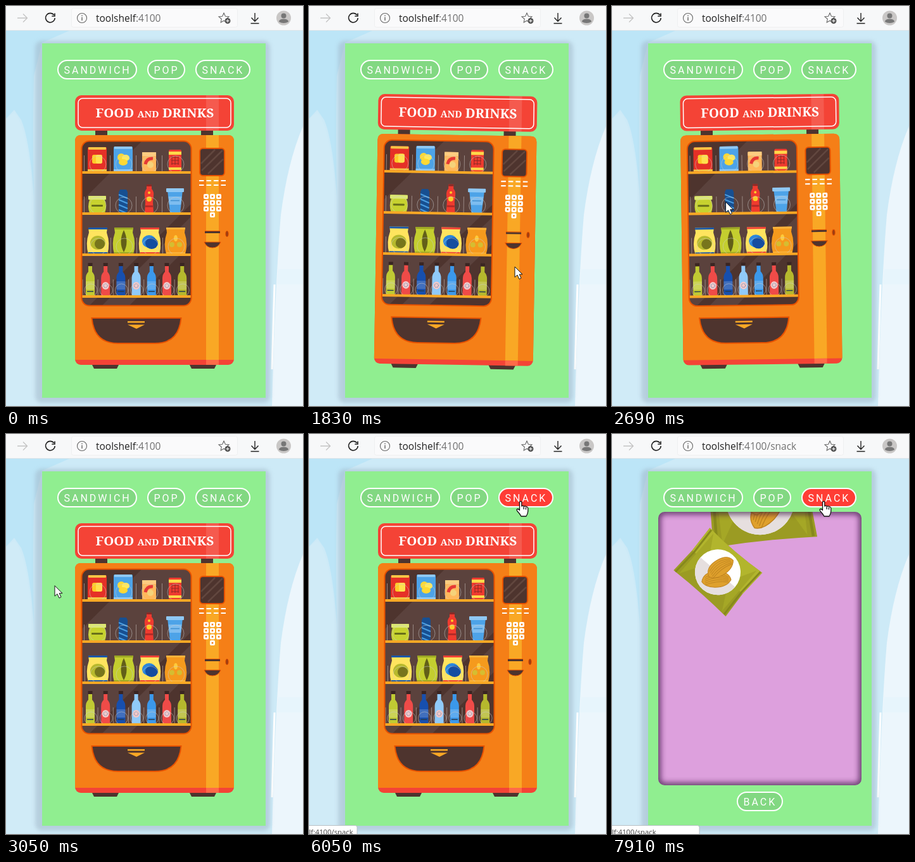
Write an HTML page that moves like this. It is 469 px wide and 632 px high and loops after 8 s.

```html
<!DOCTYPE html>
<html lang="en">
<head>
<meta charset="utf-8">
<title>Vending machine</title>
<style>
  html, body { margin: 0; width: 100%; height: 100%; overflow: hidden; }
  svg { display: block; width: 469px; height: 632px; }
  .ui { font: 15.5px "Open Sans", "Noto Sans", sans-serif; }
  .button text { font: 16px Roboto, sans-serif; letter-spacing: 3px; fill: #fff; }
  .sign { font-family: "Noto Serif", serif; font-weight: 600; font-stretch: extra-condensed; fill: #fff; text-anchor: middle; }
</style>
</head>
<body>
<svg id="stage" viewBox="0 0 469 632" xmlns="http://www.w3.org/2000/svg"></svg>
<script>
const DARK = '#4e342e', RED = '#f44336', ORANGE = '#f57f17', AMBER = '#f9a825', RIM = '#e65100';
const LOOP = 8000, OPEN_AT = 6320;

// Markup helpers
const rect = (x, y, w, h, fill, r = 0, extra = '') =>
  `<rect x="${x}" y="${y}" width="${w}" height="${h}" rx="${r}" fill="${fill}" ${extra}/>`;
const oval = (x, y, rx, ry, fill, extra = '') =>
  `<ellipse cx="${x}" cy="${y}" rx="${rx}" ry="${ry}" fill="${fill}" ${extra}/>`;
const path = (d, fill = 'none', extra = '') => `<path d="${d}" fill="${fill}" ${extra}/>`;
const line = (d, color, width = 1, extra = '') =>
  path(d, 'none', `stroke="${color}" stroke-width="${width}" ${extra}`);
const at = (x, y, body) => `<g transform="translate(${x} ${y})">${body}</g>`;
const repeat = (n, make) => Array.from({ length: n }, (_, i) => make(i)).join('');

function button(id, label, x, y, w) {
  return `<g class="button">${rect(x + 1, y + 1, w - 2, 29, '#82d882', 14.5, `id="${id}" stroke="#fff" stroke-width="2"`)}
    <text x="${x + 10.5}" y="${y + 21.5}">${label}</text></g>`;
}

function toolbar() {
  return rect(0, 0, 469, 38, '#f7f8f9') + rect(0, 38, 469, 1, '#dfe5e8') +
    rect(103.5, 3.5, 262, 30, '#fafafb', 3, 'stroke="#efeff0"') +
    line('M18 19H33M27 12.5L33.5 19L27 25.5', '#c4c4c4', 1.3) +
    line('M75.7 14.2A7.3 7.3 0 1 0 77.2 19M77 11.5V16H72.3', '#222', 1.6) +
    oval(120, 19, 7.5, 7.5, 'none', 'stroke="#666" stroke-width="1.1"') +
    line('M120 17.5V23M120 14.5V16', '#666', 1.4) +
    `<text class="ui" x="142" y="25" fill="#222">toolshelf<tspan fill="#707070">:4100</tspan><tspan id="route" fill="#707070"></tspan></text>` +
    line('M344 11L346.4 16.2L352 16.8L347.8 20.5L349 26L344 23.2L339.2 26L340.3 20.5L336 16.8L341.7 16.2Z', '#666', 1.1) +
    oval(350, 23.5, 4.5, 4.5, '#555') + line('M347.5 23.5H352.5M350 21V26', '#fff', 1.1) +
    line('M393 11V24M387.5 18.5L393 24.3L398.5 18.5M386.5 27.5H399.5', '#222', 1.4) +
    oval(438.5, 19, 11.5, 11.5, '#c9c7c6') + oval(438.5, 15.5, 4, 4, '#777') +
    path('M431 25Q431 20.5 438.5 20.5T446 25Q438.5 29 431 25Z', '#777');
}

function sky() {
  return rect(0, 38, 469, 594, '#cdeaf7') +
    path('M0 39H100L57 58L44 110Q42 190 44 300Q37 210 24 180L13 164L0 178Z', '#bce5f7') +
    path('M0 178L13 168Q34 190 43 310L54 632H0Z', '#d0ebf7') +
    path('M469 190Q445 245 434 330Q425 440 420 632H469Z', '#ecf6fc') +
    path('M430 416H469V440H428Z', '#e7f5fc') +
    line('M424 440L420 574', '#fff', 3) +
    rect(46, 55, 371, 572, '#9db3c4', 10, 'opacity=".5" filter="url(#shadow)"');
}

// Goods: each is drawn around x = 0 standing on y = 0
function jar(w, h, body, lid) {
  return rect(-w / 2, -h, w, h, body, 2) + rect(-w / 2 + 1, -h, w - 2, 4, lid, 1) + rect(-w / 2, -4, w, 3, lid);
}
const tins = [
  jar(30, 39, '#e53027', '#f6c445') + rect(-8, -27, 16, 14, '#ffca28', 3) + rect(-2, -27, 10, 14, '#ffe04d', 3),
  jar(30, 40, '#4da3e8', '#8fc8f4') + oval(-3, -23, 6, 6, '#fdd835') + oval(4, -22, 6, 5, '#ffe95c') + oval(0, -15, 7, 5, '#fdd835'),
  rect(-11, -31, 22, 31, '#ffb85c', 2) + rect(-11, -31, 22, 6, '#ffcc80') +
    line('M-6 -12Q-4 -22 6 -21', '#e53935', 5) + oval(2, -11, 5, 5, '#f5d27a'),
  rect(-10, -35, 20, 35, '#ef3b2f', 2) + rect(-10, -32, 20, 5, '#ffd84a') + rect(-10, -7, 20, 4, '#ffd84a') +
    repeat(3, i => line(`M-6 ${-23 + i * 5}H6M${-5 + i * 5} -25V-11`, '#8f2b25', 1))
];
const drinks = [
  path('M-14 -27H14V-21H12Q16 -10 12 0H-12Q-16 -10 -12 -21H-14Z', '#c7d22f') + rect(-14, -27, 28, 6, '#dce775', 2) +
    rect(-9, -13, 18, 3, '#69701a', 1),
  path('M-5 -37H5L7 -33V-3L5 0H-5L-7 -3V-33Z', '#174f91') +
    repeat(4, i => line(`M-7 ${-29 + i * 8}L7 ${-23 + i * 8}`, '#4a9de0', 2)),
  path('M-4 -45H4V-38Q8 -34 7 -27L6 -17L7 0H-7L-6 -17L-7 -27Q-8 -34 -4 -38Z', '#ef3b2f') +
    rect(-4, -45, 8, 3, '#8c2a26') + oval(0, -22, 4, 4, '#ffca28') + oval(0, -32, 2, 2, '#ffca28') + rect(-6, -12, 12, 3, '#b52a27'),
  path('M-12 -36H12L8 0H-8Z', '#4da3e8') + rect(-14, -39, 28, 6, '#8fc8f4', 1) +
    path('M-10.5 -26H10.5L9 -13H-9Z', '#7dbdf0') + line('M-7 -19.5H7', '#3f8fd0', 1.5)
];
const pouch = (fill, rim) => path('M-15 -42H15L14 -34Q20 -17 15 0H-15Q-20 -17 -14 -34Z', fill) +
  rect(-15, -42, 30, 3, rim) + rect(-15, -3, 30, 2, rim);
const pouches = [
  pouch('#ffe45e', '#1b58a8') + oval(0, -18, 12, 11, '#b7b92d') + oval(3, -16, 8, 8, '#77751c'),
  pouch('#c4ce2f', '#9da824') + path('M0 -38Q9 -19 0 -3Q-9 -19 0 -38Z', '#625f18'),
  pouch('#ffe45e', '#ef4337') + oval(-1, -20, 11, 10, '#2b87dc') + oval(3, -17, 10, 9, '#144da0'),
  pouch('#f59a1d', '#fbb33b') + oval(0, -25, 3, 5, '#ffca3a') + oval(-6, -15, 4, 4, '#d5bd31') + oval(6, -15, 4, 4, '#d5bd31')
];
const bottle = (color, round) =>
  path('M-3 -49H3V-38Q7 -34 7 -28V0H-7V-28Q-7 -34 -3 -38Z', color) + rect(-3.5, -52, 7, 5, '#3a2522') +
  (round ? oval(0, -16, 5.5, 6, '#f3c8c9') + oval(0, -16, 3, 3, 'none', 'stroke="#6583a8" stroke-dasharray="1.5 1"')
         : rect(-7, -23, 14, 13, '#fff', 0, 'opacity=".18"') + line('M-5 -7H5', '#263d50', 1.4));
const bottles = ['#c0ca33', '#ef4b48', '#174fae', '#90caf9', '#3b98eb', '#ef4b48', '#b5b82d']
  .map((color, i) => bottle(color, i % 2));

function shelf(items, x, y, step) {
  const coil = step > 30 ? 13 : 10;
  return items.map((item, i) => at(x + i * step, y - 3, item +
      oval(1, -coil + 1, coil, coil, 'none', 'stroke="#ccc" stroke-width=".8" opacity=".65"') +
      line(`M${-step / 2} -26V0`, '#a89a95', .8))).join('') +
    rect(119, y - 4, 174, 4, AMBER);
}

function machine() {
  const diagonal = (from, to) =>
    path(`M${from - 213} 213H${to - 213}L${to - 474} 474H${from - 474}Z`, '#fff', 'opacity=".07"');
  const keys = [...Array(9).keys()].map(i => [i % 3, Math.floor(i / 3)]).concat([[1, 3]]);
  return rect(141, 195, 19, 10, DARK) + rect(308, 195, 19, 10, DARK) +
    rect(109, 141, 251, 56, RED, 10) + rect(316, 141, 20, 56, '#fff', 0, 'opacity=".12"') +
    rect(114, 146, 241, 46, 'none', 7, 'stroke="#fff" stroke-width="1.5"') +
    '<text id="sign" class="sign" x="235" font-size="36">FOOD <tspan font-size=".72em">AND</tspan> DRINKS</text>' +
    path('M135 565H179L175 573H139ZM289 565H333L329 573H293Z', DARK) +
    rect(109, 204, 251, 363, RED, 9) + path('M109 559V213Q109 204 118 204H351Q360 204 360 213V559Z', ORANGE) +
    rect(316, 204, 20, 355, AMBER) + rect(316, 559, 20, 8, '#ff6a48') +
    rect(119.5, 213.5, 173, 260, DARK, 12) +
    `<g clip-path="url(#window)">${diagonal(428, 605)}${diagonal(625, 668)}
      ${shelf(tins, 144, 265, 41)}${shelf(drinks, 144, 330, 41)}${shelf(pouches, 145, 395, 41)}${shelf(bottles, 133, 461, 24.2)}
    </g>` +
    rect(119.5, 213.5, 173, 260, 'none', 12, `stroke="${RIM}" stroke-width="2"`) +
    rect(306, 225, 39, 43, DARK, 5, `stroke="${RIM}" stroke-width="2"`) +
    line('M308 249L330 227M309 260L342 228M319 265L343 242', '#62473f', 2.5) +
    line('M305 276H347M305 283H347', '#fff', 2.2, 'stroke-dasharray="7.5 4"') +
    keys.map(([c, r]) => rect(312 + c * 10, 297 + r * 9.7, 8, 8, '#fff', 2) + rect(314.7 + c * 10, 299.7 + r * 9.7, 2.6, 2.6, ORANGE)).join('') +
    line('M314 357.5H338', DARK, 3) + line('M314 355.5H338', RIM, 1) +
    oval(349, 360, 2.2, 4.5, '#9c3d12', `stroke="${RIM}"`) +
    path('M313 373H339Q335 382 326 382T313 373Z', DARK, `stroke="${RIM}"`) +
    path('M135.5 493H276.5Q273 533 235 533H177Q139 533 135.5 493Z', DARK, `stroke="${RIM}" stroke-width="2"`) +
    rect(192, 498, 27, 2.5, AMBER) + path('M192 503.5H219L206 510Z', AMBER);
}

function chip(x, y, turn) {
  return `<g transform="translate(${x} ${y}) rotate(${turn})">${path('M-23 5Q-21 -11 0 -12Q19 -13 23 0Q17 12 -2 13Q-18 13 -23 5Z', '#dfa02c', 'stroke="#c08420"')}
    ${repeat(5, i => line(`M-18 ${-2 + i * 3}Q0 ${-14 + i * 4} 19 ${-4 + i * 2}`, '#bd8420', .9))}</g>`;
}
function bag(id) {
  return `<g id="${id}">${path('M-55 -45Q0 -40 54 -45L52 0L55 45Q0 41 -55 43L-53 0Z', '#9b9b23')}
    ${path('M-55 -45Q0 -40 54 -45L52 0H-53Z', '#b2b52d')}
    ${path('M-45 -42L-20 0L-45 41Z', '#a5a726')}${path('M45 -42L22 0L45 42Z', '#a5a726')}
    ${line('M-51 -44L-49 0L-51 43M51 -44L49 0L51 44', '#86881c', 3)}
    ${oval(0, 0, 36, 36, '#fff')}${path('M-36 0A36 36 0 0 0 36 0Z', '#e6dfdf')}
    <g transform="rotate(-40.5)">${chip(-2, 11, 2)}${chip(4, -8, -28)}</g></g>`;
}

function dispenser() {
  return `<g id="dispenser" clip-path="url(#panel)">${rect(73, 123, 321, 432, '#dda0dd')}
    ${bag('largeBag')}${bag('smallBag')}
    ${rect(71, 121, 325, 436, 'none', 11, 'stroke="#32103a" stroke-width="11" opacity=".75" filter="url(#soft)"')}</g>
    <g id="back">${button('backButton', 'BACK', 197, 565, 73)}</g>`;
}

stage.innerHTML = `<defs>
    <filter id="soft" x="-10%" y="-10%" width="120%" height="120%"><feGaussianBlur stdDeviation="5"/></filter>
    <filter id="shadow" x="-10%" y="-10%" width="120%" height="120%"><feGaussianBlur stdDeviation="3"/></filter>
    <clipPath id="window">${rect(119, 213, 174, 261, '#000', 12)}</clipPath>
    <clipPath id="panel">${rect(73, 123, 321, 432, '#000', 10)}</clipPath>
  </defs>
  ${sky()}${toolbar()}${rect(57, 59, 353, 560, '#90ee90')}
  ${button('sandwich', 'SANDWICH', 81, 85, 126)}${button('pop', 'POP', 223, 85, 60)}${button('snack', 'SNACK', 299, 85, 87)}
  <g id="machine">${machine()}</g>${dispenser()}
  <g id="status">${rect(-5, 618.5, 100, 20, '#fff', 3, 'id="statusBox" stroke="#b8c0c4"')}
    <text id="statusText" class="ui" x="0" y="633" style="font-size:11.3px" fill="#444"></text></g>
  <g id="cursor" stroke="#111" stroke-linejoin="round">
    ${path('M0 0V16.5L4 13L7 19.5L10 18L7.2 12H12Z', '#fff', 'id="arrow"')}
    ${path('M-1.5 1.5Q0 -.8 1.8 1.5V8Q4 6.5 5.5 8.3Q7.5 7.3 8.7 9Q11.8 8.7 11.8 12V16Q11.5 20 9 24H1Q-1 20 -5 16Q-7 13 -4.5 12.5Q-3 12.3 -1.5 14.5ZM5.2 9V13M8.5 10V13.5', '#fff', 'id="hand" stroke-width="1.3"')}
  </g>`;

const $ = id => document.getElementById(id);

// Sizes the sign uniformly to the room on the board
const sign = $('sign');
const signSize = Math.min(36, 36 * 187 / sign.getComputedTextLength());
sign.setAttribute('font-size', signSize);
sign.setAttribute('y', 169 + signSize * .357);

const clamp = v => Math.max(0, Math.min(1, v));
const mix = (a, b, k) => a + (b - a) * k;
const show = (id, on) => $(id).setAttribute('display', on ? 'inline' : 'none');

// time, x, y
const cursorPath = [
  [1120, 462, 435], [1380, 341, 411], [1830, 325, 412], [2210, 321, 411], [2690, 180, 310],
  [2860, 104, 252], [3050, 77, 240], [3500, 74, 90], [3770, 150, 101], [4420, 150, 101],
  [4690, 222, 108], [5060, 252, 105], [5510, 252, 105], [5750, 300, 103], [6050, 334, 106]
];
const hovers = [['sandwich', 3560, 4665], ['pop', 4750, 5660], ['snack', 5750, LOOP]];
// x, y, degrees at every tenth of a shake
const shakes = [[1, 1, 0], [-1, -2, -1], [-3, 0, 1], [3, 2, 0], [1, -1, 1], [-1, 2, -1],
  [-3, 1, 0], [3, 1, -1], [-1, -1, 1], [1, 2, 0], [1, -2, -1]];
const SHAKE_FROM = 1256, SHAKE_TO = 2850, SHAKE_PERIOD = 484;

function cursorAt(t) {
  const next = cursorPath.findIndex(p => p[0] > t);
  if (next < 0) return cursorPath.at(-1).slice(1);
  const [t0, x0, y0] = cursorPath[Math.max(0, next - 1)], [t1, x1, y1] = cursorPath[next];
  const k = clamp((t - t0) / (t1 - t0));
  return [mix(x0, x1, k), mix(y0, y1, k)];
}

function shakeAt(t) {
  if (t < SHAKE_FROM || t > SHAKE_TO) return '';
  const step = (t - SHAKE_FROM) / SHAKE_PERIOD % 1 * 10, i = Math.floor(step), k = step - i;
  const ease = k * k * (3 - 2 * k);
  const [x, y, turn] = shakes[i].map((v, j) => mix(v, shakes[i + 1][j], ease));
  return `translate(${x} ${y}) rotate(${turn} 234.5 357)`;
}

function place(id, x, y, turn, scale) {
  $(id).setAttribute('transform', `translate(${x} ${y}) rotate(${turn}) scale(${scale})`);
}

function draw(t) {
  const opened = t >= OPEN_AT;
  $('machine').setAttribute('transform', shakeAt(t));
  ['dispenser', 'back'].forEach(id => show(id, opened));
  show('machine', !opened);
  $('route').textContent = opened ? '/snack' : '';

  for (const [id, from, to] of hovers) {
    const k = clamp((t - from) / 250) - clamp((t - to) / 300);
    $(id).setAttribute('fill', `rgb(${[[130, 255], [216, 61], [130, 53]].map(([a, b]) => Math.round(mix(a, b, k)))})`);
  }
  const over = hovers.find(([, from, to]) => t >= from && t < to);
  const linked = hovers.filter(([, from]) => t >= from).at(-1);
  show('status', linked);
  if (linked) {
    $('statusText').textContent = 'lf:4100/' + linked[0];
    const widths = { sandwich: 100, pop: 72, snack: t >= 6420 ? 143 : 81 };
    $('statusBox').setAttribute('width', widths[linked[0]]);
  }

  const [x, y] = cursorAt(t);
  $('cursor').setAttribute('transform', `translate(${x} ${y})`);
  show('cursor', t >= 1120);
  show('arrow', !over);
  show('hand', over);

  const small = (t - 7910) / 450, large = (t - 7910) / 270;
  place('smallBag', 167, 218 + small * 145, 40.5 + small * 30, 1);
  place('largeBag', 234, 105 + large * 66, -7 + large * 8, 1.5);
}

function frame() {
  draw(performance.now() % LOOP);
  requestAnimationFrame(frame);
}
frame();
</script>
</body>
</html>
```
